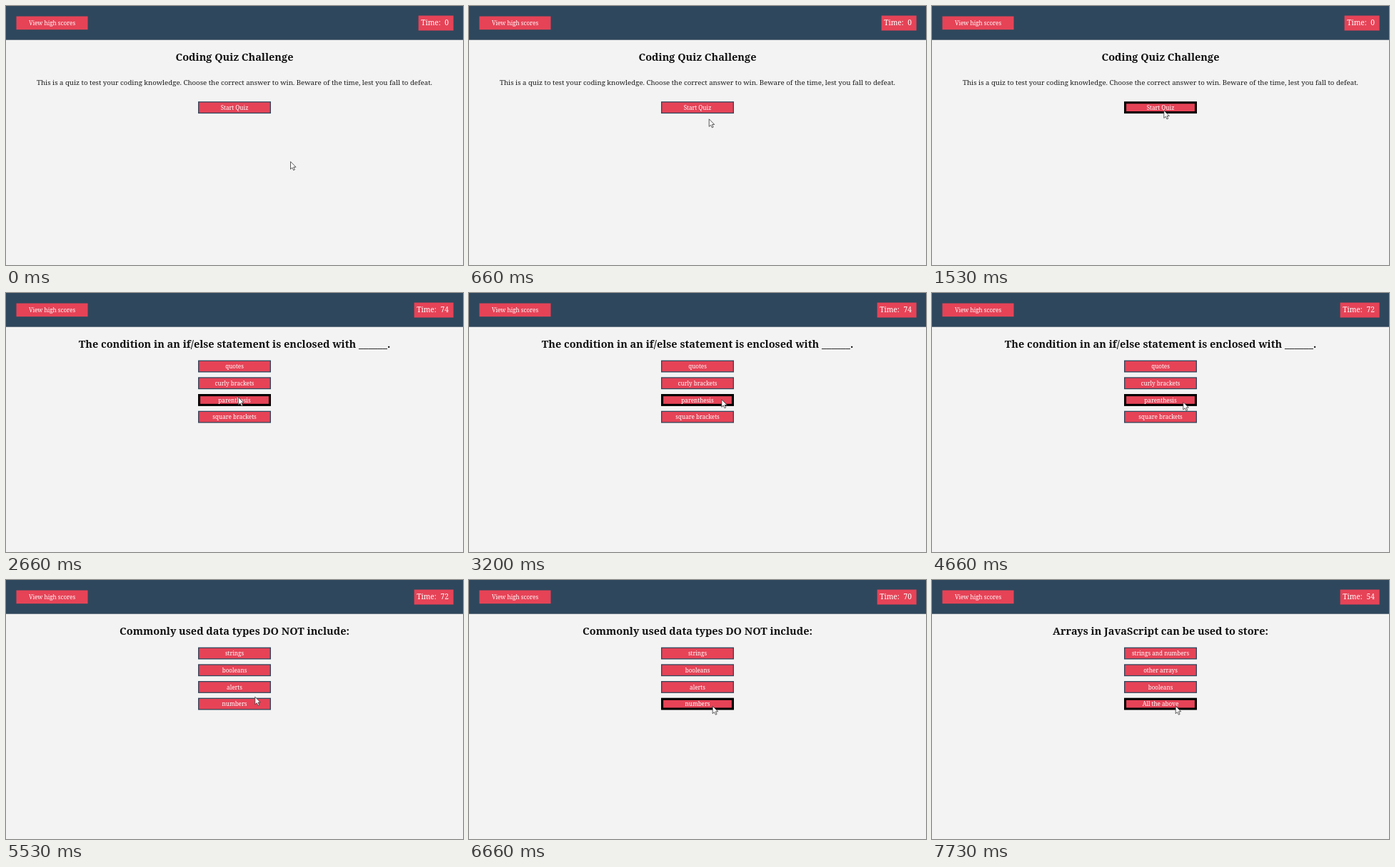
An HTML page for the animation above (8000 ms loop, 640 by 364 pixels).

```html
<!DOCTYPE html>
<html lang="en">
<head>
<meta charset="utf-8">
<title>Coding quiz</title>
<style>
  html, body { margin: 0; width: 100%; height: 100%; overflow: hidden; background: #f3f3f3; }
  svg { display: block; width: 100vw; height: 100vh; }
  text { font-family: "Noto Serif", Cambria, serif; white-space: pre; }
  .title { font-size: 14.5px; font-weight: 700; fill: #111; text-anchor: middle; }
  .intro { font-size: 9.67px; fill: #1c1c1c; text-anchor: middle; }
  .label { font-size: 8.15px; fill: #fff; text-anchor: middle; }
  .time { font-size: 10.2px; fill: #fff; }
  .red { fill: #e64357; }
</style>
</head>
<body>
<svg id="stage" viewBox="0 0 640 364">
  <rect width="640" height="364" fill="#f3f3f3"/>
  <rect width="640" height="47.7" fill="#2f475c"/>
  <rect class="red" x="14.5" y="14.5" width="100" height="18.7"/>
  <text class="label" x="64.5" y="27">View high scores</text>
  <rect class="red" id="timeBox" y="13.5" height="21"/>
  <text class="time" id="timeLabel" y="27.4">Time:</text>
  <text class="time" id="timeValue" x="620" y="27.4" text-anchor="end"></text>
  <text class="title" id="title" x="320" y="77"></text>
  <text class="intro" id="intro" x="320" y="111.4">This is a quiz to test your coding knowledge. Choose the correct answer to win. Beware of the time, lest you fall to defeat.</text>
  <g id="buttons"></g>
  <path id="cursor" d="M0 0V10.6L2.4 8.4 4.2 12.1 5.9 11.3 4.2 7.7H7.5Z" fill="#fff" stroke="#333" stroke-width=".8" stroke-linejoin="round"/>
</svg>
<script>
const LOOP = 8000, STEP = 1000 / 15;
const LEFT = 269, WIDTH = 102, HEIGHT = 16.9;

const screens = [
  { from: 0, title: "Coding Quiz Challenge", top: 134.2, options: ["Start Quiz"] },
  { from: 1660, title: "The condition in an if/else statement is enclosed with ______.",
    options: ["quotes", "curly brackets", "parenthesis", "square brackets"] },
  { from: 5400, title: "Commonly used data types DO NOT include:",
    options: ["strings", "booleans", "alerts", "numbers"] },
  { from: 6860, title: "Arrays in JavaScript can be used to store:",
    options: ["strings and numbers", "other arrays", "booleans", "All the above"] }
];

// Pointer stops: time, x, y
const stops = [
  [0, 398.5, 218.7], [860, 327, 150], [1060, 324.8, 147], [2600, 324.8, 146.5],
  [3330, 356.5, 150], [4060, 356.5, 150], [4400, 352, 153], [5400, 351, 155],
  [5530, 348.8, 164.3], [5930, 341.2, 177.2], [LOOP, 341.2, 177.2]
];

const get = id => document.getElementById(id);
const set = (el, attrs) => { for (const k in attrs) el.setAttribute(k, attrs[k]); };
const add = (tag, parent, attrs = {}) => {
  const el = document.createElementNS("http://www.w3.org/2000/svg", tag);
  set(el, attrs);
  return parent.appendChild(el);
};

const buttons = [0, 1, 2, 3].map(() => {
  const group = add("g", get("buttons"));
  return {
    group,
    frame: add("rect", group, { x: LEFT, width: WIDTH, height: HEIGHT }),
    face: add("rect", group, { class: "red" }),
    label: add("text", group, { class: "label", x: 320 })
  };
});

function pointerAt(t) {
  const i = stops.findIndex(s => s[0] > t);
  const [t0, x0, y0] = stops[i - 1], [t1, x1, y1] = stops[i];
  const p = (t - t0) / (t1 - t0), e = p * p * (3 - 2 * p);
  return [x0 + (x1 - x0) * e, y0 + (y1 - y0) * e];
}

// Counts down each second after the start; the wrong answer costs 15.
function secondsLeft(t) {
  if (t < screens[1].from) return 0;
  return 75 - Math.floor((t - screens[1].from) / 1000) - (t >= screens[3].from ? 15 : 0);
}

function drawButton(button, text, top, [px, py]) {
  button.group.style.display = text ? "" : "none";
  if (!text) return;
  const hover = px >= LEFT && px <= LEFT + WIDTH && py >= top && py <= top + HEIGHT;
  const b = hover ? 3.1 : 1.3;
  set(button.frame, { y: top, fill: hover ? "#000" : "#2f475c" });
  set(button.face, { x: LEFT + b, y: top + b, width: WIDTH - 2 * b, height: HEIGHT - 2 * b });
  set(button.label, { y: top + 11.5 });
  button.label.textContent = text;
}

function draw(time) {
  const t = Math.floor((time + 7) / STEP) * STEP % LOOP;
  const screen = screens.filter(s => t >= s.from).pop();
  const pointer = pointerAt(t);
  const left = secondsLeft(t);
  const boxX = left > 9 ? 571.6 : 577.6;

  get("title").textContent = screen.title;
  get("intro").style.display = screen === screens[0] ? "" : "none";
  get("timeValue").textContent = left;
  set(get("timeBox"), { x: boxX, width: 626.6 - boxX });
  set(get("timeLabel"), { x: boxX + 3.6 });
  buttons.forEach((b, i) => drawButton(b, screen.options[i], (screen.top || 94.6) + i * 23.7, pointer));
  set(get("cursor"), { transform: `translate(${pointer})` });
}

const start = performance.now();
function tick() {
  draw((performance.now() - start) % LOOP);
  requestAnimationFrame(tick);
}
tick();
</script>
</body>
</html>
```
